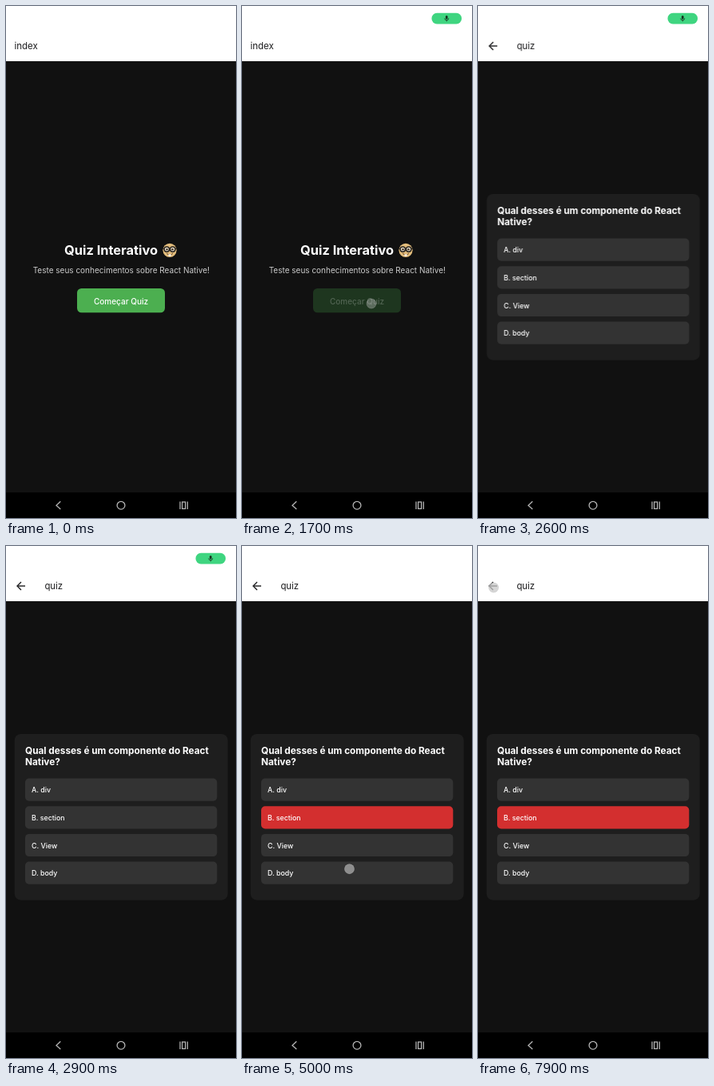
Animation, 288 px wide and 640 px high, one loop 8 s. Source, as an HTML page with a canvas:

```html
<!DOCTYPE html>
<html lang="pt">
<head>
<meta charset="utf-8">
<title>Quiz</title>
<style>
html, body { margin: 0; width: 100%; height: 100%; overflow: hidden; background: #fff; }
canvas { display: block; width: 288px; height: 640px; }
</style>
</head>
<body>
<canvas id="stage"></canvas>
<script>
const W = 288, H = 640, LOOP = 8000;
const FONT = 'Inter, "Open Sans", sans-serif';
const DPR = window.devicePixelRatio || 1;
const SLIDE_AT = 2234, SLIDE_MS = 450, SLIDE_PX = 28.8;

const stage = document.getElementById('stage');
const layer = document.createElement('canvas');
const [main, over] = [stage, layer].map(c => {
  c.width = W * DPR;
  c.height = H * DPR;
  const g = c.getContext('2d');
  g.scale(DPR, DPR);
  return g;
});

const clamp = x => Math.min(1, Math.max(0, x));
const ramp = (t, a, b) => clamp((t - a) / (b - a));
const mix = (a, b, k) => a + (b - a) * k;
const inOut = k => k < 0.5 ? 2 * k * k : 1 - 2 * (1 - k) * (1 - k);

const cubic = (a, b, c, d, u) => {
  const v = 1 - u;
  return v * v * v * a + 3 * v * v * u * b + 3 * v * u * u * c + u * u * u * d;
};

function solve(xs, ys, x) {
  let lo = 0, hi = 1;
  for (let i = 0; i < 24; i++) {
    const m = (lo + hi) / 2;
    if (cubic(...xs, m) < x) lo = m; else hi = m;
  }
  return cubic(...ys, lo);
}

// Fast start with a long, slow settle
function emphasized(x) {
  const k = 1 / 6;
  return x < k
    ? solve([0, 0.05, 0.13333, k], [0, 0, 0.06, 0.4], x)
    : solve([k, 0.20833, 0.25, 1], [0.4, 0.82, 1, 1], x);
}

function rect(g, x, y, w, h, r, color) {
  g.fillStyle = color;
  g.beginPath();
  g.roundRect(x, y, w, h, r);
  g.fill();
}

function disc(g, x, y, r, color) {
  g.fillStyle = color;
  g.beginPath();
  g.arc(x, y, r, 0, 7);
  g.fill();
}

function line(g, pts, color, width) {
  g.strokeStyle = color;
  g.lineWidth = width;
  g.beginPath();
  pts.forEach(([x, y]) => g.lineTo(x, y));
  g.stroke();
}

function text(g, str, x, y, size, weight, color, align = 'left') {
  g.font = `${weight} ${size}px ${FONT}`;
  g.textAlign = align;
  g.fillStyle = color;
  g.fillText(str, x, y);
}

function backdrop(g) {
  rect(g, 0, 0, W, 69, 0, '#fff');
  rect(g, 0, 69, W, 539, 0, '#111');
}

function nerdFace(g, x, y) {
  disc(g, x, y, 8.6, '#e3bd7c');
  g.strokeStyle = '#2b2620';
  g.lineWidth = 1.5;
  for (const s of [-1, 1]) {
    disc(g, x + s * 3.7, y - 1.2, 3.2, '#efe6d4');
    g.beginPath();
    g.arc(x + s * 3.7, y - 1.2, 3.2, 0, 7);
    g.stroke();
    disc(g, x + s * 3.5, y - 1.1, 1.2, '#3a2d20');
  }
  line(g, [[x - 8.6, y - 2], [x - 7, y - 2]], '#2b2620', 1.3);
  line(g, [[x + 7, y - 2], [x + 8.6, y - 2]], '#2b2620', 1.3);
  g.lineWidth = 1;
  g.strokeStyle = '#5d3c1e';
  g.beginPath();
  g.arc(x, y + 2, 4, 0.4, 2.75);
  g.stroke();
  rect(g, x - 1.7, y + 5.2, 3.4, 2, 0.4, '#fff');
}

function homeScreen(g, t) {
  backdrop(g);
  text(g, 'index', 10.5, 54.2, 11.5, 400, '#1c1c1e');
  text(g, 'Quiz Interativo', 73, 311, 16.4, 700, '#fff');
  nerdFace(g, 205, 305.3);
  text(g, 'Teste seus conhecimentos sobre React Native!', 144.3, 334.4, 10, 400, '#ccc', 'center');
  const dim = inOut(ramp(t, 1540, 1690)) - inOut(ramp(t, 2100, 2350));
  g.globalAlpha = mix(1, 0.23, dim);
  rect(g, 89, 353, 110, 30.3, 5.5, '#4caf50');
  text(g, 'Começar Quiz', 144, 372.6, 10, 500, '#fff', 'center');
  g.globalAlpha = 1;
}

function quizScreen(g, t) {
  backdrop(g);
  line(g, [[24, 50], [14, 50]], '#1c1c1e', 1.4);
  line(g, [[19, 45], [14, 50], [19, 55]], '#1c1c1e', 1.4);
  text(g, 'quiz', 48.4, 54.2, 11.4, 400, '#1c1c1e');
  rect(g, 10.7, 235, 267, 207.7, 8, '#1e1e1e');
  text(g, 'Qual desses é um componente do React', 24, 260.3, 11.8, 700, '#fff');
  text(g, 'Native?', 24, 274.4, 11.8, 700, '#fff');
  ['A. div', 'B. section', 'C. View', 'D. body'].forEach((label, i) => {
    const y = 290.5 + i * 34.7;
    const picked = i === 1;
    const dim = picked ? inOut(ramp(t, 3800, 3950)) - inOut(ramp(t, 4000, 4250)) : 0;
    g.globalAlpha = mix(1, 0.23, dim);
    rect(g, 24, y, 240.3, 28.2, 5, picked && t >= 4000 ? '#d32f2f' : '#333');
    text(g, label, 32, y + 17.6, 8.8, 500, '#fff');
    g.globalAlpha = 1;
  });
}

function micChip(g, t) {
  if (t < 300 || t >= 4700) return;
  const grow = inOut(ramp(t, 300, 600));
  const fold = inOut(ramp(t, 3300, 3700));
  const gone = ramp(t, 4500, 4700);
  const w = mix(mix(6, 37.5, grow), 7, fold);
  const h = mix(mix(6, 13.6, grow), 7, fold) * (1 - gone);
  const right = mix(275, 279, fold);
  g.globalAlpha = 1 - gone;
  rect(g, right - w, 15.6 - h / 2, w, h, Math.min(6.5, h / 2), '#3fd580');
  g.globalAlpha = grow * (1 - ramp(fold, 0, 0.5));
  const x = right - w / 2;
  rect(g, x - 1.3, 12, 2.6, 4.6, 1.3, '#17341f');
  g.strokeStyle = '#17341f';
  g.lineWidth = 0.8;
  g.beginPath();
  g.arc(x, 15.3, 2.5, 0, Math.PI);
  g.stroke();
  line(g, [[x, 17.8], [x, 19.3]], '#17341f', 0.9);
  g.globalAlpha = 1;
}

function navBar(g) {
  const c = '#b4b4b4';
  rect(g, 0, 608, W, 32, 0, '#000');
  line(g, [[68.3, 619.3], [63, 624.2], [68.3, 629]], c, 1.3);
  g.beginPath();
  g.arc(144, 624.2, 4.9, 0, 7);
  g.stroke();
  g.strokeRect(220.6, 620, 4, 8.4);
  for (const x of [218, 227.3]) line(g, [[x, 619.4], [x, 629]], c, 1.3);
}

// x, y, down, fade start, fade end
const TOUCHES = [
  [162, 372, 1500, 1640, 1760],
  [140, 340, 3750, 3880, 3980],
  [134.5, 403.7, 4870, 4980, 5090],
  [161.8, 374, 6590, 6720, 6830],
  [19.6, 52, 7790, 7960, 8060]
];

function touches(g, t) {
  for (const [x, y, down, up, end] of TOUCHES) {
    if (t < down || t >= end) continue;
    g.globalAlpha = 0.75 * (1 - ramp(t, up, end));
    disc(g, x, y, 6.2, '#c8c8c8');
    g.globalAlpha *= 0.5;
    g.strokeStyle = '#c0c0c0';
    g.lineWidth = 0.8;
    g.beginPath();
    g.arc(x, y, 6, 0, 7);
    g.stroke();
  }
  g.globalAlpha = 1;
}

function draw(t) {
  rect(main, 0, 0, W, H, 0, '#fff');
  const p = emphasized(ramp(t, SLIDE_AT, SLIDE_AT + SLIDE_MS));
  if (p < 1 && t < SLIDE_AT + SLIDE_MS) {
    main.save();
    main.translate(-SLIDE_PX * p, 0);
    homeScreen(main, t);
    main.restore();
  }
  const alpha = ramp(t, SLIDE_AT + 50, SLIDE_AT + 133);
  if (alpha > 0) {
    over.clearRect(0, 0, W, H);
    quizScreen(over, t);
    main.globalAlpha = alpha;
    main.drawImage(layer, SLIDE_PX * (1 - p), 0, W, H);
    main.globalAlpha = 1;
  }
  micChip(main, t);
  navBar(main);
  touches(main, t);
}

const start = performance.now();
function tick() {
  draw((performance.now() - start) % LOOP);
  requestAnimationFrame(tick);
}
tick();
</script>
</body>
</html>
```
